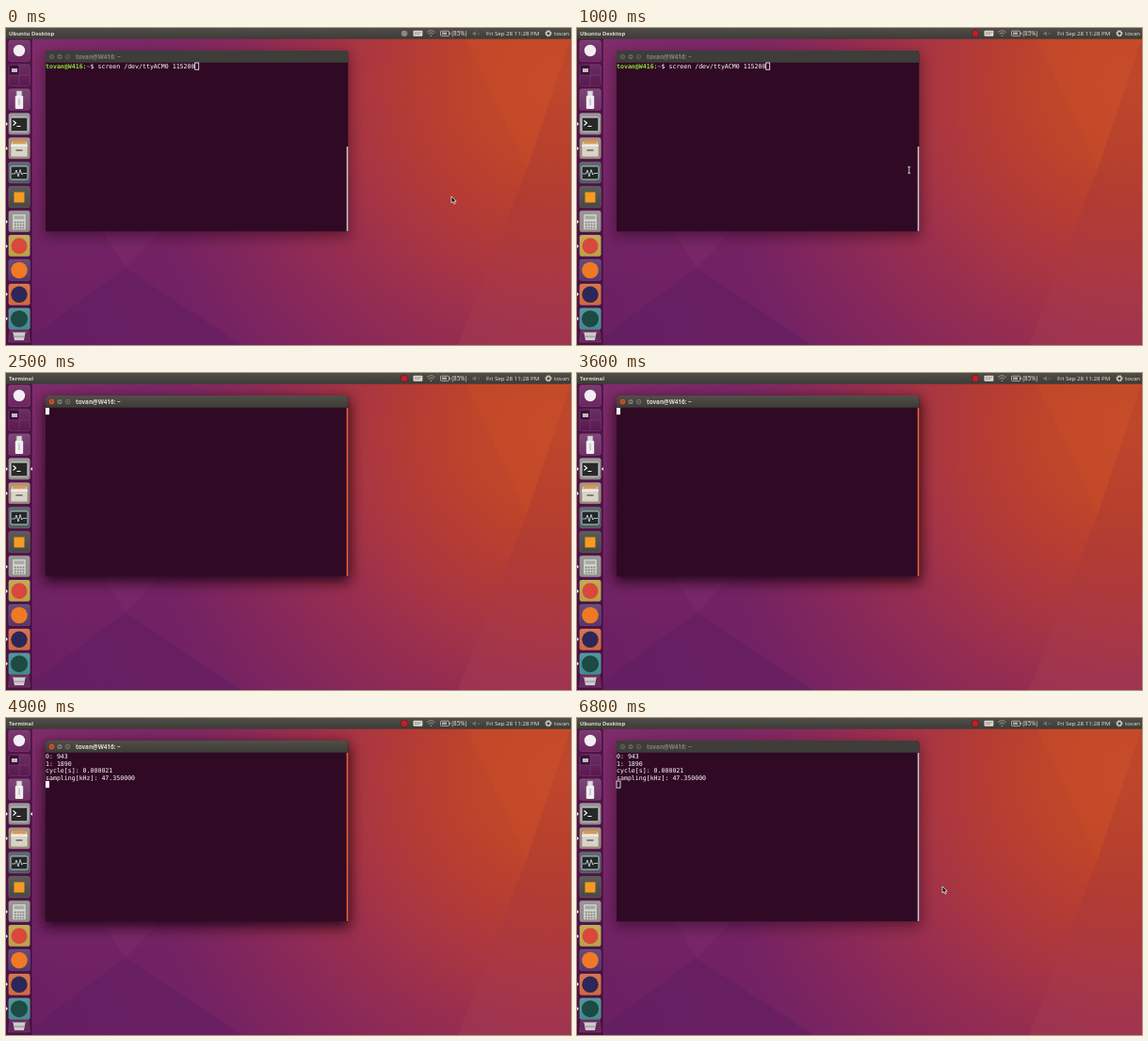
Animation, 600 px wide and 337 px high, one loop 6900 ms. Source, as an HTML page:

```html
<!DOCTYPE html>
<html lang="en">
<head>
<meta charset="utf-8">
<title>Serial terminal session</title>
<style>
html, body { margin: 0; width: 100%; height: 100%; overflow: hidden; background: #5e1c5f; }
svg { display: block; width: 100%; height: 100%; }
text { white-space: pre; }
.ui { font: 6.15px "Noto Sans", "Open Sans", sans-serif; fill: #dfdbd2; }
.bold { font-weight: 700; }
.mono { font: 6.58px "DejaVu Sans Mono", monospace; fill: #fff; }
</style>
</head>
<body>
<svg viewBox="0 0 600 337" preserveAspectRatio="none">
  <defs>
    <radialGradient id="sky" gradientUnits="userSpaceOnUse" cx="585" cy="60" r="620">
      <stop offset="0" stop-color="#c64b29"/>
      <stop offset=".15" stop-color="#be442a"/>
      <stop offset=".25" stop-color="#b53c34"/>
      <stop offset=".34" stop-color="#a93641"/>
      <stop offset=".43" stop-color="#9b2f4d"/>
      <stop offset=".59" stop-color="#84275b"/>
      <stop offset=".72" stop-color="#732263"/>
      <stop offset="1" stop-color="#6b2063"/>
    </radialGradient>
    <linearGradient id="facet" x1="0" y1="0" x2="0" y2="1">
      <stop offset="0" stop-color="#952e3c" stop-opacity=".12"/>
      <stop offset=".5" stop-color="#952e3c" stop-opacity=".22"/>
      <stop offset="1" stop-color="#b54a58" stop-opacity=".22"/>
    </linearGradient>
    <radialGradient id="corner" gradientUnits="userSpaceOnUse" cx="30" cy="20" r="260">
      <stop offset="0" stop-color="#86306e" stop-opacity=".75"/>
      <stop offset="1" stop-color="#86306e" stop-opacity="0"/>
    </radialGradient>
    <linearGradient id="bar" x1="0" y1="0" x2="0" y2="1">
      <stop offset="0" stop-color="#504e48"/>
      <stop offset="1" stop-color="#3c3b37"/>
    </linearGradient>
    <linearGradient id="gloss" x1="0" y1="0" x2="0" y2="1">
      <stop offset="0" stop-color="#fff" stop-opacity=".1"/>
      <stop offset="1" stop-color="#fff" stop-opacity="0"/>
    </linearGradient>
    <filter id="blur" x="-20%" y="-25%" width="140%" height="150%"><feGaussianBlur stdDeviation="7"/></filter>
  </defs>

  <g id="wallpaper">
    <rect width="600" height="337" fill="url(#sky)"/>
    <rect width="600" height="337" fill="url(#corner)"/>
    <path d="M127 255L28 328V337H250Z" fill="#561a5e" opacity=".35"/>
    <path d="M127 255L100 212H168Z" fill="#8a3a78" opacity=".2"/>
    <path d="M553 150L600 10V337H480Z" fill="url(#facet)"/>
    <path d="M553 150L488 11H600Z" fill="#cb5029" opacity=".3"/>
  </g>

  <g id="launcher">
    <rect y="11" width="28" height="326" fill="#3d0836" opacity=".67"/>
    <path d="M28 11V337" stroke="#8b4580" stroke-width=".5" opacity=".4"/>
    <g id="tiles"></g>
    <g id="icons">
      <circle cx="14" cy="24" r="6.2" fill="#f3eef2"/>

      <path d="M3 50H25M14 39V61" stroke="#7b3a72" stroke-width=".7"/>
      <rect x="3.5" y="39.5" width="10" height="10" fill="#3a1238"/>
      <path d="M6 43H12V47H6Z" fill="#c6b9c4"/>

      <path d="M11.2 67H16.8V73H11.2Z" fill="#ddd" stroke="#a9a3aa" stroke-width=".5"/>
      <rect x="9.8" y="72" width="8.4" height="14" rx="1" fill="#f0eff0"/>
      <path d="M14 75V82" stroke="#a9a3aa" stroke-width=".9"/>

      <rect x="5" y="95" width="18" height="15" rx="1.2" fill="#282828" stroke="#e2e2e2"/>
      <path d="M7.5 98.5L10.5 101L7.5 103.5M11.5 104.5H15.5" fill="none" stroke="#fff" stroke-width="1.1"/>

      <path d="M6 120H22L23 124V137H5V124Z" fill="#d9d4ca" stroke="#887e6e" stroke-width=".6"/>
      <path d="M7 119.5H21V123H7Z" fill="#dc9853"/>
      <path d="M5 125H23" stroke="#f4f1ea" stroke-width="1.6"/>
      <path d="M10.5 130H17.5" stroke="#857c70" stroke-width="2"/>

      <rect x="5" y="147" width="18" height="14" rx="1" fill="#23272a" stroke="#c3c9c9"/>
      <path d="M6 155H9.5L11 151L13 158L15 150.5L16.8 156L18 154.5H22" fill="none" stroke="#dcebe8" stroke-width=".8"/>

      <rect x="8.5" y="174.5" width="11" height="11" fill="#f79a1f"/>

      <rect x="7" y="198" width="14" height="16.5" rx="1" fill="#dddcd8" stroke="#8b8984" stroke-width=".5"/>
      <rect x="8.5" y="199.5" width="11" height="4" fill="#a5aaa2"/>
      <path d="M8.7 206.5H19.5M8.7 209.5H19.5M8.7 212.5H19.5" stroke="#85837d" stroke-width="1.8" stroke-dasharray="2 .9"/>

      <circle cx="14" cy="231.8" r="8.5" fill="#d9483b"/>
      <circle cx="14" cy="257.5" r="8.8" fill="#ef7925"/>
      <circle cx="14" cy="283.3" r="8.7" fill="#2c2758"/>
      <circle cx="14" cy="309.2" r="9" fill="#1d4a43"/>

      <path d="M7.5 324H20.5L19 332H9Z" fill="#cfcbce"/>
      <path d="M6.5 323.5H21.5M8.5 328H19.5" stroke="#918891" stroke-width="1"/>
    </g>
    <g id="pips" fill="#eee"></g>
    <path id="active" d="M28 100V104L25.9 102Z" fill="#eee"/>
  </g>

  <g id="panel">
    <rect width="600" height="11.7" fill="url(#bar)"/>
    <text id="app" class="ui bold" x="3" y="7.7" style="font-size:5.9px"></text>
    <circle id="tray" cx="423" cy="5.8" r="3.8" stroke="#3a1a1a" stroke-width=".5"/>
    <rect x="432.5" y="2.8" width="9.8" height="6" rx=".8" fill="#dfdbd2"/>
    <path d="M434 4.8H441M434 6.4H439" stroke="#6a6862" stroke-width=".8" stroke-dasharray="1.4 .6"/>
    <g fill="none" stroke="#98958e" stroke-width="1">
      <path d="M447 4.6Q451.3 .8 455.6 4.6M448.6 6.3Q451.3 4 454 6.3"/>
      <circle cx="451.3" cy="8.2" r=".5"/>
    </g>
    <rect x="461.5" y="3.2" width="9" height="5.2" rx=".8" fill="none" stroke="#c5c1b9" stroke-width=".8"/>
    <path d="M463 4.5H468V7.1H463ZM470.8 4.8H472V6.8H470.8Z" fill="#aaa79f"/>
    <text class="ui" x="473.2" y="7.8" style="font-size:6.3px">(85%)</text>
    <path d="M495.5 4.8H497L499 3.2V8.6L497 7H495.5Z" fill="#75726c"/>
    <path d="M501 4.8L503 6.9M503 4.8L501 6.9" stroke="#77746e" stroke-width=".6"/>
    <text class="ui" x="510" y="7.8">Fri Sep 28 11:28 PM</text>
    <circle cx="576" cy="5.8" r="2.2" fill="none" stroke="#dfdbd2" stroke-width="1.2"/>
    <circle cx="576" cy="5.8" r="3.1" fill="none" stroke="#dfdbd2" stroke-width="1" stroke-dasharray="1.22 1.215"/>
    <text class="ui" x="582" y="7.8">tovan</text>
  </g>

  <g id="window">
    <rect id="shadow" x="40" y="28" width="325" height="194" fill="#120210" filter="url(#blur)"/>
    <path d="M42 216.3V27Q42 24 45 24H360Q363.3 24 363.3 27V216.3Z" fill="#300a24"/>
    <path id="title" d="M42 36.7V27Q42 24 45 24H360Q363.3 24 363.3 27V36.7Z"/>
    <g id="buttons" stroke="#2d2b27" stroke-width=".6">
      <circle cx="48.5" cy="30.5" r="3.2"/>
      <circle cx="57" cy="30.5" r="3.2"/>
      <circle cx="65.5" cy="30.5" r="3.2"/>
    </g>
    <path d="M47.2 29.2L49.8 31.8M49.8 29.2L47.2 31.8M55.6 30.5H58.4M64.3 29.4H66.7V31.6H64.3Z" fill="none" stroke="#34322e" stroke-width=".7"/>
    <text id="caption" class="ui bold" x="74" y="32.9" style="font-size:6.3px">tovan@W416: ~</text>
    <rect id="scroll" x="361.7" width="1.6"/>
    <text id="command" class="mono" x="42" y="43.2"><tspan class="bold" fill="#8ae234">tovan@W416</tspan>:<tspan class="bold" fill="#729fcf">~</tspan>$ screen /dev/ttyACM0 115200</text>
    <g id="output" class="mono"></g>
    <rect id="caret" width="4" height="7.2" stroke="#fff"/>
  </g>

  <g id="pointer">
    <path id="arrow" d="M0 0V7L1.7 5.5L2.9 8.1L4.1 7.5L3 5.1H5.1Z" fill="#111" stroke="#fff" stroke-width=".7"/>
    <path id="beam" d="M-1.5 -3.2H1.5M-1.5 3.2H1.5M0 -3.2V3.2" fill="none" stroke="#ddd" stroke-width=".9"/>
  </g>
</svg>
<script>
const LOOP = 6900, STEP = 100;
const FOCUS = 1300, ENTER = 1900, REPLY = 4200, WAKE = 5500, BLUR = 6300;
const LINE = 7.5;
const NS = "http://www.w3.org/2000/svg";
const $ = id => document.getElementById(id);

function add(parent, tag, attrs, text = "") {
  const el = document.createElementNS(NS, tag);
  set(el, attrs);
  el.textContent = text;
  return $(parent).appendChild(el);
}

function set(el, attrs) {
  for (const key in attrs) el.setAttribute(key, attrs[key]);
}

function show(id, on) {
  $(id).style.display = on ? "" : "none";
}

const tileColors = ["#6c2560", "#591850", "#6e3166", "#8c8c8c", "#9c8a76", "#4c5c60", "#484946",
  "#8f8d89", "#b9a345", "#53386c", "#d2683a", "#3f8c90"];
tileColors.forEach((fill, i) => {
  const box = { x: 2.8, y: 12.9 + i * 25.9, width: 22.6, height: 22.6, rx: 2.2 };
  add("tiles", "rect", { ...box, fill });
  add("tiles", "rect", { ...box, fill: "url(#gloss)", stroke: "#c5a9bf", "stroke-opacity": .3, "stroke-width": .6 });
});
add("tiles", "path", { d: "M4 321H24L25.5 334H2.5Z", fill: "#65295c", stroke: "#8a5580", "stroke-width": .4 });

[102, 128, 206, 232, 283, 309].forEach(y =>
  add("pips", "path", { d: `M0 ${y - 2}V${y + 2}L2 ${y}Z` }));

["0: 943", "1: 1890", "cycle[s]: 0.000021", "sampling[kHz]: 47.350000"].forEach((line, i) =>
  add("output", "text", { x: 42, y: 43.2 + i * LINE }, line));

// Pointer stops: time, x, y
const path = [[0, 473, 179], [200, 473, 179], [1000, 352.7, 151], [WAKE, 352.7, 151],
  [5900, 389, 179], [BLUR, 389, 179], [6700, 388, 179], [LOOP, 388, 179]];

function pointerAt(t) {
  const i = path.findIndex(stop => stop[0] > t);
  const [t0, x0, y0] = path[i - 1], [t1, x1, y1] = path[i];
  const u = (t - t0) / (t1 - t0), k = u * u * (3 - 2 * u);
  return [x0 + (x1 - x0) * k, y0 + (y1 - y0) * k];
}

function render(t) {
  const focused = t >= FOCUS && t < BLUR;
  const entered = t >= ENTER, replied = t >= REPLY;

  $("app").textContent = focused ? "Terminal" : "Ubuntu Desktop";
  set($("tray"), { fill: t < STEP ? "#8b8782" : "#c01f28" });
  show("active", focused);

  set($("shadow"), { opacity: focused ? .8 : .42 });
  set($("title"), { fill: focused ? "url(#bar)" : "#3e3d39" });
  set($("buttons"), { fill: focused ? "#7b7870" : "#63615b" });
  set($("buttons").firstElementChild, { fill: focused ? "#e9572c" : "#63615b" });
  $("caption").style.fill = focused ? "#dfdbd2" : "#85827b";

  const top = entered ? 37 : 126;
  set($("scroll"), { y: top, height: 216 - top, fill: focused ? "#e8663a" : "#c9c2c6" });

  show("command", !entered);
  show("output", replied);
  set($("caret"), {
    x: entered ? 42 : 200.7,
    y: 37 + (replied ? 4 * LINE : 0),
    fill: focused ? "#fff" : "none",
    "stroke-width": focused ? 0 : .8
  });

  const [x, y] = pointerAt(t), inside = x < 362;
  set($("pointer"), { transform: `translate(${x} ${y})` });
  show("pointer", t < ENTER || t >= WAKE);
  show("arrow", !inside);
  show("beam", inside);
}

const start = performance.now();
function tick() {
  const t = (performance.now() - start) % LOOP;
  render(Math.floor(t / STEP) * STEP);
  requestAnimationFrame(tick);
}
tick();
</script>
</body>
</html>
```
